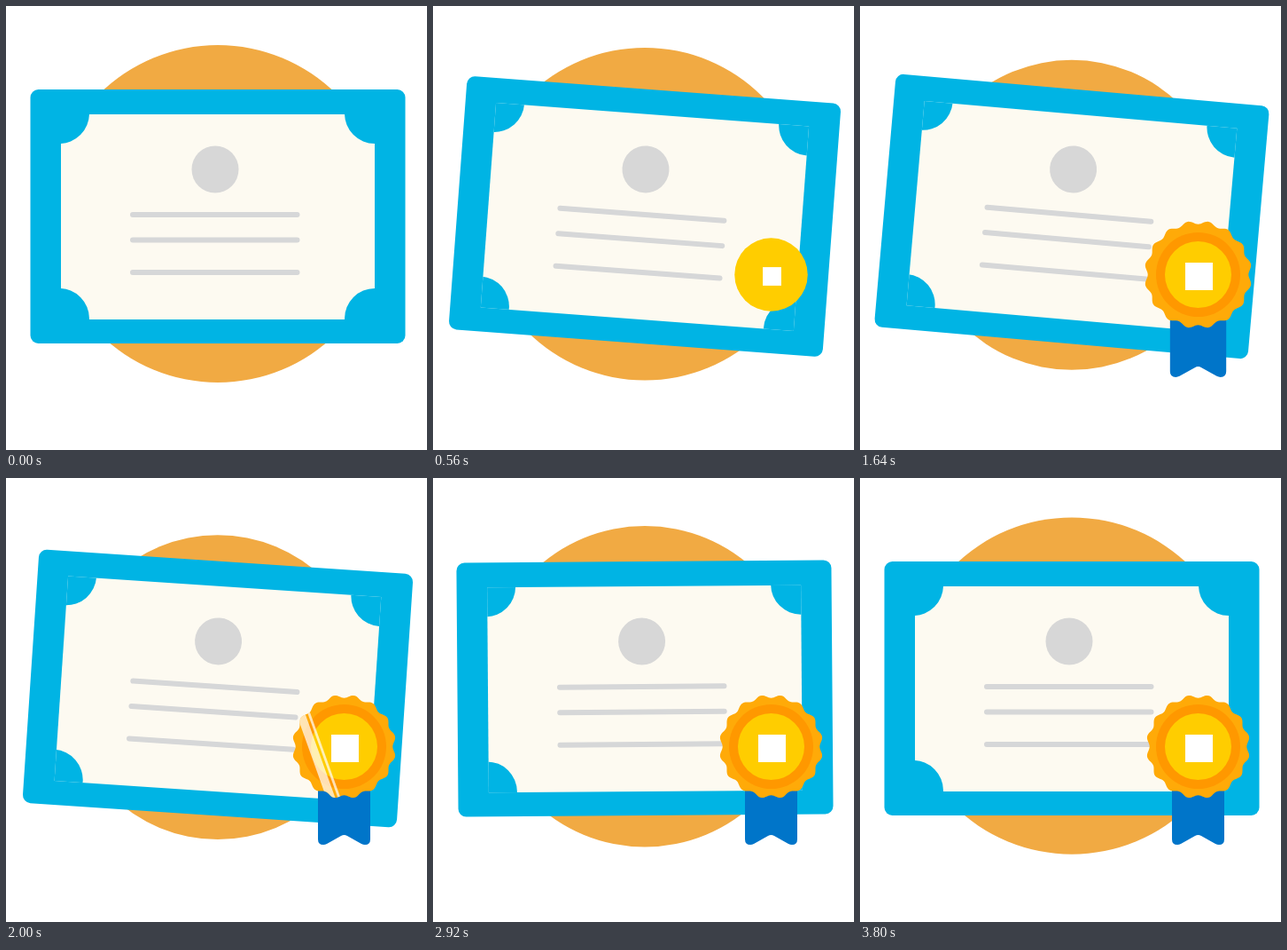
Recreate the animation shown at these times as an HTML page. Size 475 px wide and 500 px high, loop 3840 ms.

```html
<!DOCTYPE html>
<html lang="en">
<head>
<meta charset="utf-8">
<title>Certificate</title>
<style>
  html, body { margin: 0; width: 100%; height: 100%; overflow: hidden; background: #fff; }
  svg { display: block; }
</style>
</head>
<body>
<svg width="475" height="500" viewBox="0 0 475 500">
  <defs>
    <clipPath id="paperClip"><rect x="62" y="122" width="354" height="231"/></clipPath>
    <clipPath id="sealClip"><path id="sealClipPath"/></clipPath>
  </defs>

  <circle id="disc" cx="239" cy="234" r="190" fill="#f1aa43"/>

  <g id="card">
    <rect x="27.5" y="94" width="423" height="286" rx="9" fill="#00b4e4"/>
    <rect x="62" y="122" width="354" height="231" fill="#fdfaf1"/>
    <g fill="#00b4e4" clip-path="url(#paperClip)">
      <circle cx="60" cy="121" r="34"/>
      <circle cx="416" cy="121" r="34"/>
      <circle cx="60" cy="352" r="34"/>
      <circle cx="416" cy="352" r="34"/>
    </g>
    <circle cx="236" cy="184" r="26.5" fill="#d7d7d7"/>
    <path d="M143 235H328.5M143 263.5H328.5M143 300H328.5" stroke="#d6d7d8" stroke-width="6" stroke-linecap="round"/>
  </g>

  <path id="ribbon" fill="#0075c9" d="M352 290V407Q352 413 358 413Q360 413 362 412L378 403Q381.5 401 385 403L401 412Q403 413 405 413Q411 413 411 407V290Z"/>
  <path id="seal" fill="#ffaa08"/>
  <circle id="ring" cx="381.5" cy="302.5" r="47.5" fill="#ff9800"/>
  <circle id="core" cx="381.5" cy="302.5" r="37.5" fill="#ffcd00"/>
  <rect id="emblem" x="367" y="289" width="31" height="31" fill="#fff"/>
  <g clip-path="url(#sealClip)">
    <path id="shine" fill="#fff" fill-opacity=".7" d="M-21 -60H-11L32 60H22ZM-8 -60H-5L38 60H35Z"/>
  </g>
</svg>
<script>
const LOOP = 3840;
const CX = 381.5, CY = 302.5;
const el = id => document.getElementById(id);

// Cosine-eased interpolation through [time, value] keys
function ease(t, keys) {
  if (t <= keys[0][0]) return keys[0][1];
  for (let i = 1; i < keys.length; i++) {
    const [t0, v0] = keys[i - 1], [t1, v1] = keys[i];
    if (t < t1) return v0 + (v1 - v0) * (1 - Math.cos(Math.PI * (t - t0) / (t1 - t0))) / 2;
  }
  return keys[keys.length - 1][1];
}

function scale(id, s, x, y) {
  el(id).setAttribute('transform', `translate(${x} ${y}) scale(${s}) translate(${-x} ${-y})`);
}

const pop = (t, start, peak, end, over = 1.1) => ease(t, [[start, 0], [peak, over], [end, 1]]);

const outline = [];
for (let deg = 0; deg < 360; deg += 1.5) {
  const a = deg * Math.PI / 180, r = 56.7 - 1.9 * Math.cos(16 * a);
  outline.push((CX + r * Math.cos(a)).toFixed(2) + ' ' + (CY + r * Math.sin(a)).toFixed(2));
}
for (const id of ['seal', 'sealClipPath']) el(id).setAttribute('d', 'M' + outline.join('L') + 'Z');

const tilt = [[0, 0], [790, 5.33], [1300, 5], [1680, 5], [2730, -0.48], [3800, 0]];

function discScale(t) {
  const u = t / 1960;
  return 1 - 0.1 * (u < 1 ? u * u * (2 - u) : (LOOP - t) / (LOOP - 1960));
}

function draw(t) {
  scale('disc', discScale(t), 237.5, 250);
  el('card').setAttribute('transform', `rotate(${ease(t, tilt)} 239 237)`);
  scale('core', pop(t, 240, 560, 760), CX, CY);
  scale('emblem', pop(t, 400, 680, 880), 382.5, 304.5);
  scale('ring', pop(t, 600, 960, 1160), CX, CY);
  scale('seal', pop(t, 1040, 1440, 1780), CX, CY);
  scale('ribbon', pop(t, 1160, 1720, 2000, 1.13), CX, 347);
  const shining = t > 1880 && t < 2440;
  el('shine').setAttribute('visibility', shining ? 'visible' : 'hidden');
  el('shine').setAttribute('transform', `translate(${CX + 40 + (t - 2280) * 0.29} ${CY})`);
}

let start;
function tick(now) {
  start ??= now;
  draw((now - start) % LOOP);
  requestAnimationFrame(tick);
}
draw(0);
requestAnimationFrame(tick);
</script>
</body>
</html>
```
